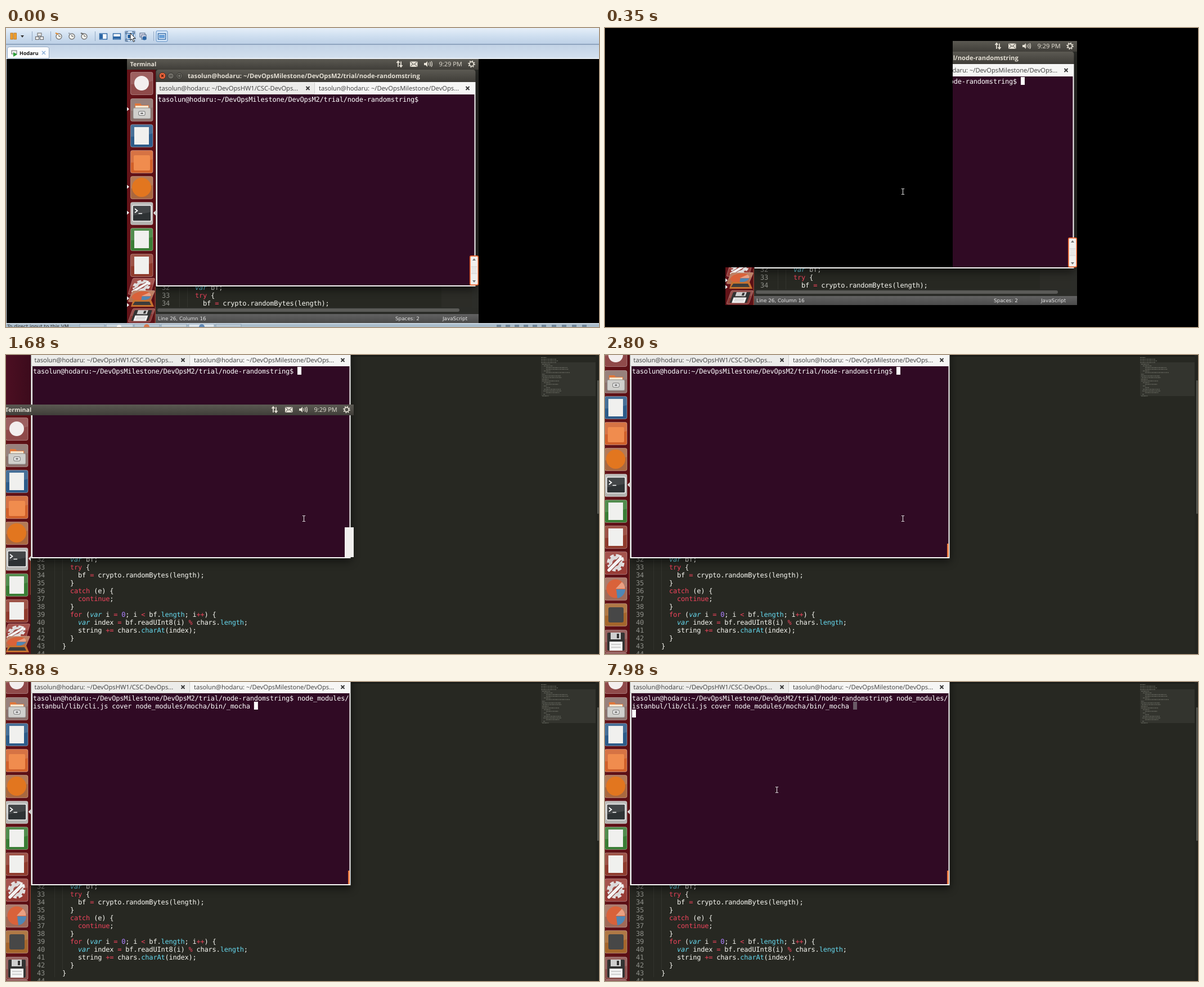
An HTML page for the animation above (8000 ms loop, 1054 px wide and 531 px high).

```html
<!DOCTYPE html>
<html lang="en">
<head>
<meta charset="utf-8">
<title>Terminal session</title>
<style>
  html, body { margin: 0; width: 100%; height: 100%; overflow: hidden; background: #000; }
  svg { display: block; width: 1054px; height: 531px; }
  text { white-space: pre; text-rendering: geometricPrecision; }
  .mono { font: 12px "DejaVu Sans Mono", monospace; letter-spacing: -.21px; fill: #f8f8f2; }
  .ui { font: 11.2px "Open Sans", sans-serif; }
  .bold { font-weight: 700; }
  .status { font: 8.8px "DejaVu Sans", sans-serif; fill: #e4e4e4; }
</style>
</head>
<body>
<svg id="stage" viewBox="0 0 1054 531" xmlns="http://www.w3.org/2000/svg"></svg>
<script>
const LOOP = 8000, CELL = 7.015, ROW = 14.05;
const USER = 'tasolun@hodaru';
const PROMPT = USER + ':~/DevOpsMilestone/DevOpsM2/trial/node-randomstring$ ';
const COMMAND = 'node_modules/istanbul/lib/cli.js cover node_modules/mocha/bin/_mocha ';
const COLUMNS = 80;

const esc = s => s.replace(/&/g, '&amp;').replace(/</g, '&lt;');
const rect = (x, y, w, h, fill, more = '') =>
  `<rect x="${x}" y="${y}" width="${w}" height="${h}" fill="${fill}" ${more}/>`;
const circle = (x, y, r, fill, more = '') => `<circle cx="${x}" cy="${y}" r="${r}" fill="${fill}" ${more}/>`;
const path = (d, fill = 'none', more = '') => `<path d="${d}" fill="${fill}" ${more}/>`;
const text = (x, y, s, cls, more = '') => `<text x="${x}" y="${y}" class="${cls}" ${more}>${esc(s)}</text>`;
const group = (id, body, more = '') => `<g id="${id}" ${more}>${body}</g>`;
const line = (color, width = 1) => `stroke="${color}" stroke-width="${width}"`;
const gradient = (id, stops, flat) =>
  `<linearGradient id="${id}" x2="${flat ? 1 : 0}" y2="${flat ? 0 : 1}">` +
  stops.map((c, i) => `<stop offset="${i / (stops.length - 1)}" stop-color="${c}"/>`).join('') + '</linearGradient>';

// ---- Code editor behind the terminal ----
const CODE = [
  '    var bf;', '    try {', '      bf = crypto.randomBytes(length);', '    }',
  '    catch (e) {', '      continue;', '    }', '    for (var i = 0; i < bf.length; i++) {',
  '      var index = bf.readUInt8(i) % chars.length;', '      string += chars.charAt(index);',
  '    }', '  }', ''
];
const TOKEN = /(\b(?:try|catch|for|continue)\b|\+=|\+\+|[=<%])|(\bvar\b)|((?<=\.)(?:length|charAt))|(\b0\b)/g;
const highlight = s => {
  let out = '', last = 0;
  for (const m of s.matchAll(TOKEN)) {
    const style = m[1] ? 'fill="#f0445c"' : m[2] ? 'fill="#66d9ef" font-style="italic"'
      : m[3] ? 'fill="#66d9ef"' : 'fill="#ae81ff"';
    out += esc(s.slice(last, m.index)) + `<tspan ${style}>${esc(m[0])}</tspan>`;
    last = m.index + m[0].length;
  }
  return out + esc(s.slice(last));
};

function editor() {
  let out = rect(-7, -43, 1061, 574, '#272822');
  for (const x of [86, 100]) out += path(`M${x + .5} 362V${x === 86 ? 524 : 510}`, 'none', line('#33342e'));
  CODE.forEach((s, i) => {
    const y = 366.7 + i * ROW;
    out += text(55, y, String(32 + i), 'mono', 'style="fill:#8f908a"') +
      `<text x="86" y="${y}" class="mono">${highlight(s)}</text>`;
  });
  return out;
}

const compactBars = () =>
  rect(552, 361, 55, 38, '#2f302a', 'opacity=".6"') +
  rect(43, 398, 575, 13, '#2b2c28') + rect(47, 400, 537, 6, '#5b5b58', 'rx="3"') +
  rect(43, 410, 575, 16, 'url(#statusFill)') +
  text(48, 421, 'Line 26, Column 16', 'status') + text(470, 421, 'Spaces: 2', 'status') +
  text(554, 421, 'JavaScript', 'status') + rect(606, -43, 12, 442, '#2c2d29');

function wideBars() {
  let out = rect(613, 0, 441, 2.5, '#191a17') + rect(951, 13, 97, 60, '#33342e');
  const indents = [0, 0, 0, 0, 2, 5, 9, 9, 5, 9, 2, 2, 3, 2, 2, 5, 9, 5, 9, 5, 4, 9, 4, 2];
  const widths = [10, 27, 30, 27, 14, 16, 38, 40, 12, 42, 5, 33, 34, 12, 30, 12, 22, 5, 7, 30, 32, 24, 3, 12];
  indents.forEach((x, i) => {
    out += path(`M${951 + x} ${4.5 + i * 2.97}h${widths[i]}`, 'none',
      line('#8b8c82', .9) + ' stroke-dasharray="3 .6 5 .8 2 .7" opacity=".75"');
  });
  return out + rect(1048, 0, 6, 531, '#23241f') + rect(1051, 45, 2.5, 237, '#5c5d57', 'rx="1"');
}

// ---- Launcher ----
const tile = (y, fill, art) =>
  `<g transform="translate(-1 ${y})">` + rect(.5, .5, 39.5, 40, fill, `rx="3" ${line('#fff', 1)} stroke-opacity=".35"`) +
  path('M1 3Q1 1 3 1H38Q40 1 40 3V16Q20 22 1 22Z', '#fff', 'opacity=".12"') + art + '</g>';
const pageTile = (y, fill) => tile(y, fill, rect(7, 5, 26, 31, '#f0f0ee'));

const wrench =
  circle(20, 20, 12, 'none', line('#e4e2e2', 7) + ' stroke-dasharray="6 3.420"') +
  circle(20, 20, 9, 'none', line('#dcdada', 6)) +
  path('M8 33L27 14', 'none', line('#8f3a34', 8) + ' stroke-linecap="round"') +
  path('M8 33L27 14', 'none', line('#f4f4f4', 5.5) + ' stroke-linecap="round"') +
  path('M27 14L29 7M27 14L34 12', 'none', line('#f4f4f4', 4));
const pie = circle(20, 20, 16.5, '#d9623a') + path('M20 20L31 8A16.500 16.500 0 0 1 36.500 20Z', '#e9a083') +
  path('M21 21H37A16.500 16.500 0 0 1 23 37Z', '#4f86b4');
const floppy = rect(5, 5, 31, 32, '#333', 'rx="2"') + rect(11, 5, 18, 12, '#cfcfcf') +
  rect(22, 7, 4, 8, '#333') + rect(9, 21, 23, 16, '#f4f4f4') + path('M12 26H29M12 31H29', 'none', line('#aaa'));
const cabinet = path('M8 9H18L20 12H33V19H8Z', '#e0783c') + path('M9 13H32V20H9Z', '#f6e6cf') +
  rect(5, 17, 31, 19, '#d0cfcc', `rx="2" ${line('#8d8d8a')}`) +
  rect(15, 23, 11, 7, '#f6f6f6', `rx="1" ${line('#666')}`) + path('M18 26.5H23', 'none', line('#555', 2));
const shell = rect(4, 6, 33, 28, '#2e3234', `rx="2" ${line('#f0f0f0', 1.6)}`) +
  path('M5 7H36V18L5 24Z', '#fff', 'opacity=".1"') +
  path('M8 12L12.5 15.5L8 19M14.500 20.500H21', 'none', line('#fff', 1.7));

const launcherIcons = () =>
  tile(-20, '#8f4a4a', circle(20, 20, 13, '#f3eeee')) +
  tile(27, '#8a6f6a', cabinet) +
  pageTile(73, '#2d5c8a') +
  tile(119, '#d0602a', rect(6, 9, 29, 27, '#f08c4e', 'rx="2"')) +
  tile(165, '#a9683f', circle(20, 20, 17, '#e2761f')) +
  tile(211, '#b3b3b0', shell) +
  pageTile(257, '#3a7d35') + pageTile(303, '#8f3b2d') +
  path('M44 226V235L40 230.500Z', '#e8e8e8') +
  [46, 184, 230, 382, 394].map(y => path(`M-7 ${y - 3.500}V${y + 3.500}L-3 ${y}Z`, '#eee')).join('');

const squashed = (y, scale, fill, art) =>
  `<g transform="translate(0 ${y}) scale(1 ${scale}) skewX(-12) translate(4 0)">${tile(0, fill, art)}</g>`;
const folded = () =>
  squashed(346, .72, '#983c36', wrench) + squashed(368, .5, '#b47050', pie) +
  path('M4 385H36L41 397H0Z', '#c6722f') + path('M7 388H33L36 394H3Z', '#3c3c3c') +
  squashed(400, .6, '#8a3a36', floppy);
const unfolded = () =>
  tile(349, '#983c36', wrench) + tile(395, '#a06a58', pie) +
  tile(441, '#a5662c', rect(7, 7, 27, 27, '#474747', 'rx="3"')) +
  tile(488, '#8a504c', floppy) + tile(529, '#7d3a38', '');

// ---- Terminal window and top panel ----
const closeMark = x => path(`M${x - 3} 6L${x + 3} 12M${x + 3} 6L${x - 3} 12`, 'none', line('#333', 1.8));
const shadow = () => rect(44, -20, 569, 386, '#000', 'opacity=".6" filter="url(#soft)"');
const terminal = () =>
  path('M44.5 -2V-19Q44.5 -24 49 -24H608Q612.500 -24 612.500 -19V-2Z', 'url(#titleFill)') +
  circle(56, -13, 5.8, '#e8643a', line('#4a2a20')) + path('M54 -15L58 -11M58 -15L54 -11', 'none', line('#4a1a10', 1.3)) +
  [71, 86].map(x => circle(x, -13, 5.4, '#6f6d66', line('#33322e'))).join('') +
  path('M68.500 -13H73.500M83.500 -15.500H88.500V-10.500H83.500Z', 'none', line('#2f2e2a')) +
  text(101, -9, USER + ': ~/DevOpsMilestone/DevOpsM2/trial/node-randomstring', 'ui bold', 'fill="#e4dfd4"') +
  rect(44.5, -2, 568, 363, '#f6f6f5') + rect(45, -1, 281, 20, '#ececea') +
  path('M326.500 -1V19M45 19.500H326', 'none', line('#cfcfcc')) +
  text(50.5, 13, USER + ': ~/DevOpsHW1/CSC-DevOps...', 'ui', 'fill="#3c3c3c"') + closeMark(314.5) +
  text(334, 12.5, USER + ': ~/DevOpsMilestone/DevOps...', 'ui', 'fill="#3c3c3c"') + closeMark(598.5) +
  rect(47, 20, 563.5, 339, '#300a24') +
  rect(441, 35, 7, 14, '#6a5a66', 'id="ghost"') +
  rect(0, 0, 7, 14, '#fff', 'id="caret"') +
  text(48, 33, '', 'mono', 'id="row0" style="fill:#fff"') +
  text(48, 47, '', 'mono', 'id="row1" style="fill:#fff"');

const scrollHandle = () =>
  rect(602.8, 306.8, 14.500, 51.500, '#f1f0ee', `rx="2" ${line('#e8622c', 1.7)}`) +
  path('M605 326H615M605 338H615', 'none', line('#d0cecb')) +
  [328.5, 331, 333.500, 336].map(y => path(`M606 ${y}H614`, 'none', line('#d8d6d3', .8))).join('') +
  path('M607 315H613L610 311Z', '#777') + path('M607 350H613L610 354Z', '#777');

function panel() {
  const gear = circle(605.5, -34, 3.8, 'none', line('#e4dfd4', 1.8)) +
    circle(605.5, -34, 5.4, 'none', line('#e4dfd4', 2) + ' stroke-dasharray="1.8 2.44"');
  return rect(-7, -43, 625, 19, 'url(#panelFill)') +
    text(-1.5, -29.8, 'Terminal', 'ui bold', 'fill="#e8e3d8" style="font-size:10.6px"') +
    path('M475 -29V-38M472.500 -36L475 -39L477.500 -36M480 -38.500V-30M477.500 -32L480 -29L482.500 -32', 'none', line('#e4dfd4', 1.8)) +
    rect(496, -38.5, 13.500, 9.5, '#e4dfd4', 'rx="1"') +
    path('M497 -38L502.700 -33L508.500 -38M497 -29.500L501 -34M508.500 -29.500L504.500 -34', 'none', line('#4b4943')) +
    path('M521 -36H524L527 -39V-29L524 -32H521Z', '#e4dfd4') +
    path('M529 -36.500Q530.500 -34 529 -31.500M531.500 -38Q534 -34 531.500 -30M534 -39Q537 -34 534 -29', 'none', line('#e4dfd4', 1.2)) +
    text(547.5, -30, '9:29 PM', 'ui', 'fill="#e4dfd4" style="font-size:11px"') + gear;
}

// ---- Host window around the guest ----
function hostWindow() {
  const ink = '#4a6484', blue = '#2c66a5';
  const divider = x => path(`M${x}.500 6V23`, 'none', line('#93a9c4'));
  const clock = (x, hand) => circle(x, 15, 5, '#f4f4f0', line('#777', 1.4)) + path(`M${x} 12V15H${x + 3}`, 'none', line('#555')) +
    path(`M${x - 6} 9L${x - 1} 11`, 'none', line(hand, 2));
  const screen = (x, inner) => rect(x - 6.5, 10, 13, 10, '#fff', line(blue, 1.4)) + inner;
  const task = (x, w, fill) => rect(x, 526, w, 5, fill, line('#7f95a8', .7));
  return rect(0, 0, 1054, 28, 'url(#toolFill)') + rect(0, 28, 1054, 2, '#8fa5bf') +
    rect(0, 30, 1054, 25, 'url(#tabFill)') + rect(0, 53.5, 1054, 1.5, '#f4f7fb') +
    rect(8, 9, 4.5, 11, '#f0a030', line('#b56c10', .8)) + rect(14, 9, 4.5, 11, '#f0a030', line('#b56c10', .8)) +
    path('M26 13H32L29 17Z', '#333') + [46, 79, 158, 262].map(divider).join('') +
    rect(56, 9, 7, 5, '#e8e8e8', line('#666')) + rect(52.500, 15.500, 6, 5, '#e8e8e8', line('#666')) + rect(60.500, 15.500, 6, 5, '#e8e8e8', line('#666')) +
    clock(94, '#e08a30') + clock(117, '#9aa4ae') + clock(139, '#666') +
    screen(173, rect(167, 11, 5, 8, blue)) + screen(197, rect(191, 15, 12, 4, blue)) +
    rect(211, 5, 19, 19, '#d5e6f8', `rx="2" ${line('#86a8cf')}`) + screen(220, rect(216, 12, 8, 6, blue)) +
    path('M213 11V7H217M224 7H228V11M213 19V23H217', 'none', line(ink, 1.5)) +
    rect(238, 9, 9, 7, '#dde', line(ink)) + rect(241, 12, 8, 8, '#dde', line(ink)) + circle(246, 18, 3.5, blue) +
    rect(267, 5, 20, 19, '#d5e6f8', `rx="2" ${line('#5f8fc4')}`) + screen(277, rect(272, 12, 10, 6, '#6aa0d8')) +
    path('M2.500 54V37Q2.500 33.500 6 33.500H72Q76.500 33.500 76.500 37V54Z', '#fbfcfe', line('#93a9c4')) +
    rect(10, 40, 9, 6, '#eee', line('#666')) + path('M13 43V51L20 47Z', '#2ea03a') +
    text(24, 47.8, 'Hodaru', 'ui bold', 'fill="#111" style="font-size:9px"') +
    path('M64 41L70 47M70 41L64 47', 'none', line('#8db0d8', 1.5)) +
    rect(0, 55, 1054, 469, '#000') + rect(0, 55, 1, 469, '#e6ecf2') +
    rect(0, 524, 1054, 7, '#a9bccb') + rect(0, 524, 1054, 1.5, '#d8e3ec') +
    text(2, 533, 'To direct input to this VM', 'status', 'style="fill:#333"') +
    task(131, 44, '#b9c8d4') + task(178, 48, '#c9d5de') + task(228, 45, '#b9c8d4') + task(276, 45, '#c9d5de') +
    task(325, 45, '#dfe8f0') + task(373, 45, '#b9c8d4') +
    circle(201, 531, 4, '#f4f4f4') + circle(250, 531, 5, '#d9774c') + circle(348, 531, 5, '#5e86b4') +
    [876, 892, 908, 924, 940, 956, 974, 992, 1010, 1028].map(x => rect(x - 4, 527, 8, 4, '#70879b')).join('') +
    path('M221 9V22L224 19.500L226.500 24.500L228.500 23.500L226 18.500H230Z', '#fff', line('#000', .9));
}

document.getElementById('stage').innerHTML =
  '<defs>' +
  gradient('toolFill', ['#e6eff9', '#cfdff0', '#bdd0e6']) + gradient('tabFill', ['#c3d3e6', '#d3e0ee']) +
  gradient('panelFill', ['#5b5952', '#403e39']) + gradient('titleFill', ['#5c5a53', '#3f3d38']) +
  gradient('statusFill', ['#626262', '#4a4a4a']) + gradient('dockFill', ['#641318', '#5a0f15'], true) +
  gradient('coverFill', ['#4c0f22', '#3c0b1c'], true) +
  '<filter id="soft" x="-10%" y="-10%" width="120%" height="120%"><feGaussianBlur stdDeviation="8"/></filter>' +
  '<clipPath id="guestClip"><rect id="guestArea"/></clipPath></defs>' +
  rect(0, 0, 1054, 531, '#000') +
  group('host', hostWindow()) +
  group('guest',
    editor() + group('compact', compactBars()) + group('wide', wideBars()) + shadow() +
    rect(-7, -24, 51, 555, 'url(#dockFill)') + rect(42.5, 362, 1.5, 64, '#8a3f30') +
    group('dock', launcherIcons() + group('folded', folded()) + group('unfolded', unfolded())) +
    rect(0, 0, 44, 88, 'url(#coverFill)', 'id="dockCover"') +
    terminal() + group('handle', scrollHandle()) +
    rect(602, 306, 16, 53, '#f1f0ee', 'id="blank"') +
    rect(608, 335, 3, 24, '#ee7f45', 'id="thumb"') +
    group('panel', panel()), 'clip-path="url(#guestClip)"') +
  rect(0, 0, 618, 425, '#000', 'id="mask"') +
  group('beam', path('M-2.500 -5H-.500M.500 -5H2.500M0 -5V5M-2.500 5H-.500M.500 5H2.500', 'none', line('#eee')));

const el = {};
document.querySelectorAll('[id]').forEach(node => el[node.id] = node);
const show = (node, on) => node.setAttribute('display', on ? 'inline' : 'none');
const move = (node, x, y) => node.setAttribute('transform', `translate(${x} ${y})`);
const within = (t, from, to) => t >= from && t < to;

const CARET_OFF = [[0, 70], [2590, 2800], [3360, 3850], [4340, 4760], [5670, 5880], [6300, 6790], [7420, 7840]];
const TYPED = [[4900, 1], [4970, 5], [5320, 17], [5880, COMMAND.length]];

function update(t) {
  const windowed = t < 140, wide = t >= 1680, settled = t >= 2240;

  show(el.host, windowed);
  show(el.mask, within(t, 350, 420));
  if (windowed) move(el.guest, 222, 98);
  else if (t < 420) move(el.guest, 221, 66);
  else move(el.guest, 0, 0);
  const area = wide ? [0, 0, 1054, 531] : [-7, -43, 625, 469];
  ['x', 'y', 'width', 'height'].forEach((name, i) => el.guestArea.setAttribute(name, area[i]));

  show(el.compact, !wide);
  show(el.wide, wide);
  show(el.handle, !wide);
  show(el.blank, wide && !settled);
  show(el.thumb, settled);
  show(el.folded, !settled);
  show(el.unfolded, settled);
  show(el.dockCover, wide && !settled);
  show(el.panel, t < 2100);
  move(el.panel, 0, wide ? 131 : 0);
  move(el.dock, 0, within(t, 1680, 2100) ? 131 : 0);

  let count = 0;
  for (const [at, n] of TYPED) if (t >= at) count = n;
  const shown = PROMPT + COMMAND.slice(0, count);
  el.row0.textContent = shown.slice(0, COLUMNS);
  el.row1.textContent = shown.slice(COLUMNS);

  const entered = t >= 6930;
  const row = entered ? 2 : Math.floor(shown.length / COLUMNS);
  const col = entered ? 0 : shown.length % COLUMNS;
  el.caret.setAttribute('x', 48 + col * CELL);
  el.caret.setAttribute('y', 21 + row * 14);
  show(el.caret, !CARET_OFF.some(([a, b]) => within(t, a, b)));
  show(el.ghost, entered);

  show(el.beam, within(t, 140, 4900) || t >= 7840);
  const step = Math.min(2, Math.floor((t - 7840) / 70));
  if (step < 0) move(el.beam, 529.5, 290.5);
  else move(el.beam, 403.5 - 49 * step, 235.5 - 22 * step);
}

const start = performance.now();
function tick() {
  update((performance.now() - start) % LOOP);
  requestAnimationFrame(tick);
}
tick();
</script>
</body>
</html>
```
